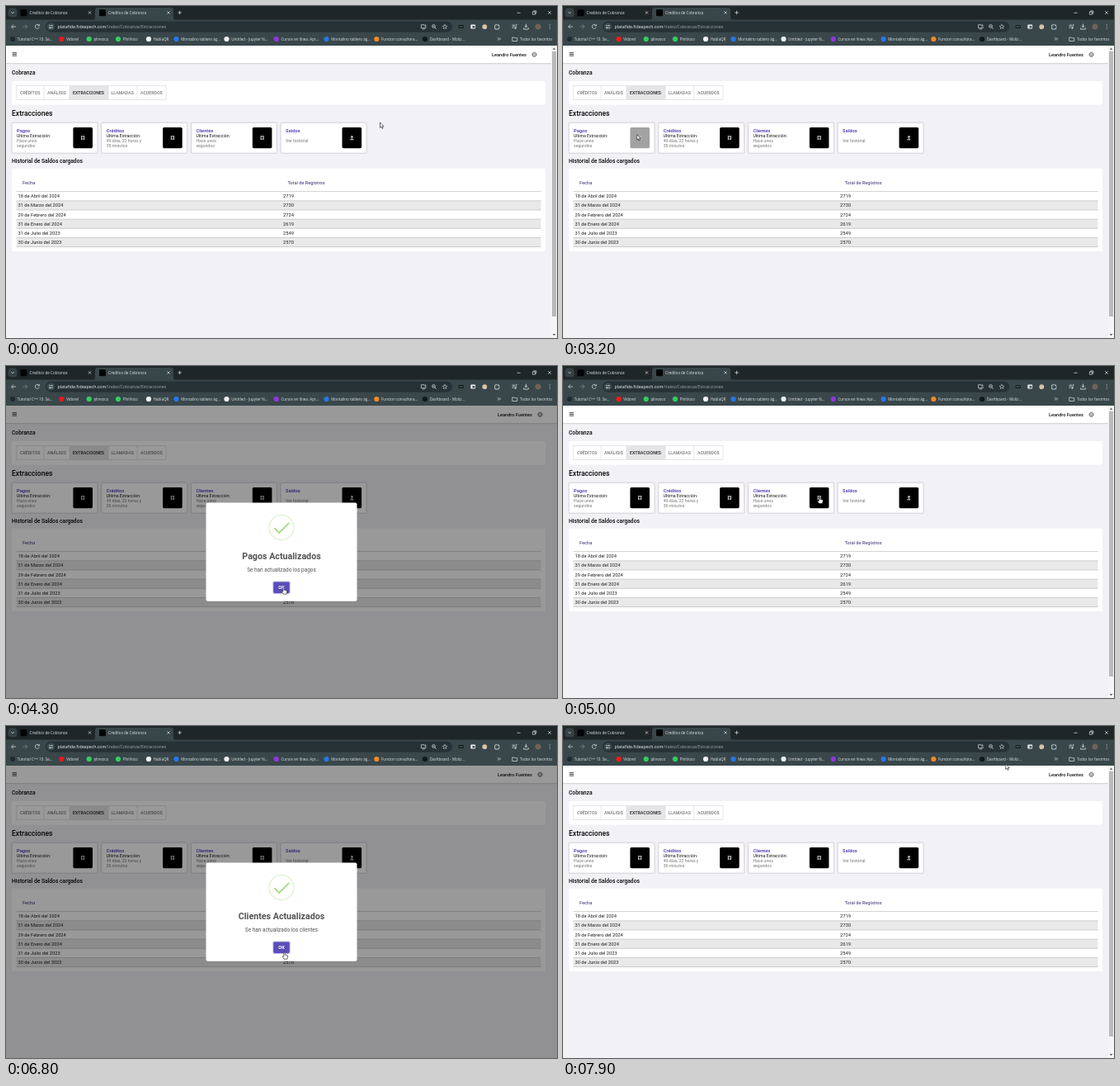
An HTML page that plays this animation: 668 px wide and 402 px high, repeating every 8.7 s.

```html
<!DOCTYPE html>
<html lang="es">
<head>
<meta charset="utf-8">
<title>Extracciones</title>
<style>
  html, body { margin: 0; width: 100%; height: 100%; overflow: hidden; background: #f1f1f6; }
  svg { display: block; width: 100%; height: 100%; }
  text { font-family: Roboto, sans-serif; white-space: pre; }
  .ui { font-family: "Open Sans", "Noto Sans", sans-serif; }
</style>
</head>
<body>
<svg id="stage" viewBox="0 0 668 402" xmlns="http://www.w3.org/2000/svg"></svg>
<script>
const LOOP = 8700, STEP = 100;
const PURPLE = '#4a2fb0', LIGHT = '#dfe5e6';

// Markup helpers
const rect = (x, y, w, h, fill, extra = '') =>
  `<rect x="${x}" y="${y}" width="${w}" height="${h}" fill="${fill}" ${extra}/>`;
const dot = (x, y, r, fill, extra = '') => `<circle cx="${x}" cy="${y}" r="${r}" fill="${fill}" ${extra}/>`;
const line = (d, color = LIGHT, width = 0.7, extra = '') =>
  `<path d="${d}" fill="none" stroke="${color}" stroke-width="${width}" ${extra}/>`;
const text = (x, y, str, size, fill, extra = '') =>
  `<text x="${x}" y="${y}" font-size="${size}" fill="${fill}" ${extra}>${str}</text>`;
const uiText = (x, y, str, size = 4.6, fill = LIGHT) => text(x, y, str, size, fill, 'class="ui"');
const cross = (x, y, r) => line(`M${x - r} ${y - r}l${2 * r} ${2 * r}m0 ${-2 * r}l${-2 * r} ${2 * r}`);
const medium = 'font-weight="500"', bold = 'font-weight="700"';

function tabStrip() {
  const tab = x => rect(x, 4.2, 8, 8, '#050505', 'rx="1"') + uiText(x + 11, 9.9, 'Creditos de Cobranza') + cross(x + 84, 8, 1.6);
  return rect(0, 0, 668, 17, '#1e2628') +
    rect(2.5, 2.5, 11, 11, '#344145', 'rx="3.5"') + line('M6.2 7.2l1.8 1.8 1.8-1.8') +
    `<path d="M105 17q3 0 3-3V5q0-3 3-3h89q3 0 3 3v9q0 3 3 3z" fill="#39474b"/>` +
    tab(17.5) + tab(113) +
    line('M208.3 8h4.6M210.6 5.7v4.6M619.5 8.3h4.2') +
    line('M638.4 7h3.2v3.2h-3.2zM639.6 7V5.9h3.2V9h-1.2') + cross(659, 8, 1.8);
}

function toolbar() {
  const url = `platafide.fideapech.com<tspan fill="#9eabae">/Index/Cobranza/Extracciones</tspan>`;
  return rect(0, 16.5, 668, 31.5, '#39474b') +
    line('M12 25H6.5m2.5-2.5L6.5 25 9 27.5') + line('M20.5 25H26m-2.5-2.5L26 25l-2.5 2.5', '#7f8c90') +
    line('M40 23.6a2.5 2.5 0 1 0 .2 2.2M40.3 22v2h-2') +
    rect(48, 18.5, 493, 13.2, '#273236', 'rx="6.6"') + dot(54.3, 25, 4.6, '#3d4b50') +
    line('M52 23.8h2.8M52 26.4h1M54.4 26.4H57') + dot(55.8, 23.8, 0.8, LIGHT) + dot(53.4, 26.4, 0.8, LIGHT) +
    uiText(62.5, 27, url, 5.24, '#f1f4f4') +
    line('M507 22.7h-3.5v4h5.6v-1.5M504.8 28h3M508.3 22v2.7m-1.2-1.1l1.2 1.2 1.2-1.2') +
    dot(518.5, 24.5, 1.9, 'none', `stroke="${LIGHT}" stroke-width=".7"`) + line('M520 26l1.8 1.8M517.6 24.5h1.8') +
    line('M532 22.2l.8 1.9 2.1.2-1.6 1.3.5 2-1.8-1.1-1.8 1.1.5-2-1.6-1.3 2.1-.2z', LIGHT, 0.55) +
    rect(548.5, 23, 6.5, 4, '#151b1c', 'rx="1.5"') + line('M549.7 25h4', '#8ec9a4', 0.8, 'stroke-dasharray="1 .5"') +
    rect(563.3, 22.5, 5.8, 5, '#e8eceb', 'rx=".8"') + rect(565.5, 24.2, 2.8, 2.2, '#343e42') +
    dot(580.3, 25.2, 2.9, '#d8c3a4') +
    line('M592.7 23h1.5q.3-1.6 1.4 0h2v1.8q1.5.7 0 1.5V28h-4.9z', LIGHT, 0.8) +
    line('M613.6 23h3.3M613.6 24.7h3.3M613.6 26.4h1.7M618.2 26.7v-4h1.5') + dot(617.4, 26.7, 1, LIGHT) +
    line('M630.5 21.6v4m-1.8-1.6l1.8 1.8 1.8-1.8M627.7 26.4v1.7h5.6v-1.7', LIGHT, 0.8) +
    dot(645, 25, 3.5, '#74605c') + [22.8, 25, 27.2].map(y => dot(659.3, y, 0.55, LIGHT)).join('');
}

function bookmarks() {
  const items = [
    [8, '#20292d', 'Tutorial C++ 10. Se...'], [67.5, '#f01818', 'Vidorel'], [100.7, '#31cf62', 'plinvoco'],
    [136, '#31cf62', 'PlinVoco'], [173, '#f2f4f4', 'HablaQR'], [206.5, '#2876e8', 'Montalino tablero ág...'],
    [267.5, '#eef0f0', 'Untitled - Jupyter N...'], [327.7, '#9037e0', 'Cursos en línea: Apr...'],
    [388.5, '#2876e8', 'Montalino tablero ág...'], [449.3, '#f28a24', 'Funcion consultora...'],
    [508, '#111819', 'Dashboard - Moliz...']
  ];
  return items.map(([x, color, label]) => dot(x, 40, 3.1, color) + uiText(x + 5.7, 41.7, label, 4.55)).join('') +
    line('M596 38.3l1.6 1.6-1.6 1.6m2-3.2l1.6 1.6-1.6 1.6') +
    line('M613.8 38h2.2l.8.8h3v3.7h-6z') + uiText(623, 41.7, 'Todos los favoritos', 4.5);
}

function card(x, title, id, lines) {
  const grey = '#777';
  const body = lines.length === 1
    ? text(x + 6, 164.8, lines[0], 5.2, grey)
    : text(x + 6, 158.8, 'Ultima Extracción:', 5.15, '#161616') +
      text(x + 6, 164.8, lines[0], 5.15, grey) + text(x + 6, 170.8, lines[1], 5.15, grey, `id="${id}Age"`);
  const cx = x + 86.2;
  const icon = lines.length === 1
    ? line(`M${cx} 161v-3.6m-1.5 1.5l1.5-1.6 1.5 1.6M${cx - 2.1} 161.8h4.2`, '#fff', 0.9)
    : line(`M${cx - 1.6} 157.9h3.2v3.2h-3.2z`, '#fff', 0.8) +
      line(`M${cx - 2.2} 157.4h1m2.4 0h1m-4.4 4.3h1m2.4 0h1`, '#fff', 0.7);
  return rect(x, 141.2, 104, 37, '#fff', 'rx="1" stroke="#cdc5ce" stroke-width=".8"') +
    text(x + 6, 152.5, title, 5.75, PURPLE, medium) + body +
    rect(x + 74.4, 147, 23.6, 25.2, '#000', `rx="1.6" id="${id}Button"`) + `<g id="${id}Icon">${icon}</g>`;
}

function table() {
  const rows = [['18 de Abril del 2024', 2719], ['31 de Marzo del 2024', 2730], ['29 de Febrero del 2024', 2724],
    ['31 de Enero del 2024', 2619], ['31 de Julio del 2023', 2549], ['30 de Junio del 2023', 2570]];
  const rule = y => line(`M12.5 ${y}H648.5`, '#bdbdbf', 0.7);
  return rect(7, 196.5, 647, 100.5, '#fff', 'rx="2"') +
    text(20, 215.8, 'Fecha', 5.65, '#5b5288', medium) + text(341.5, 215.8, 'Total de Registros', 5.6, '#5b5288', medium) +
    rule(224.6) + rows.map(([date, total], i) => {
      const y = 224.7 + i * 11.15;
      return (i % 2 ? rect(12.5, y, 636, 11.15, '#e9e9ea') + rule(y) + rule(y + 11.15) : '') +
        text(14.5, y + 7.5, date, 5.72, '#1c1c1c') + text(336, y + 7.5, total, 5.75, '#1c1c1c');
    }).join('');
}

function page() {
  const tabs = [[17, 'CRÉDITOS'], [50, 'ANÁLISIS'], [81, 'EXTRACCIONES'], [127.5, 'LLAMADAS'], [163, 'ACUERDOS']];
  return rect(0, 48, 668, 354, '#f1f1f6') + rect(0, 48, 668, 21.5, '#fff') + rect(0, 69.3, 668, 0.9, '#c9c9ce') +
    line('M7.6 56.6h5.4M7.6 58.4h5.4M7.6 60.2h5.4', '#333', 0.9) +
    `<g id="account">${text(589, 61, 'Leandro Fuentes', 5.6, '#161616', medium)}
      ${dot(640.5, 58.8, 2.2, 'none', 'stroke="#444" stroke-width=".7"')}
      ${dot(640.5, 58.8, 2.8, 'none', 'stroke="#444" stroke-width=".7" stroke-dasharray="1.1 1.1"')}
      ${dot(640.5, 58.8, 0.8, 'none', 'stroke="#444" stroke-width=".5"')}</g>` +
    text(7, 83.2, 'Cobranza', 6.7, '#080808', medium) +
    rect(7, 91, 647, 28.7, '#fff', 'rx="2"') + rect(77, 96.5, 47, 17, '#e5e5e7') +
    line('M12.7 96.5H194V113.5H12.7zM46 96.5v17M77 96.5v17M124 96.5v17M159 96.5v17', '#dcdce0', 0.7) +
    tabs.map(([x, s], i) => text(x, 106.8, s, 5.25, i === 2 ? '#222' : '#777', medium)).join('') +
    text(7, 133.2, 'Extracciones', 8.6, '#080808', medium) +
    card(7, 'Pagos', 'pagos', ['Hace unos', 'segundos']) +
    card(115.7, 'Créditos', 'creditos', ['49 días, 22 horas y', '35 minutos']) +
    card(224.4, 'Clientes', 'clientes', ['Hace unos', 'segundos']) +
    card(333.1, 'Saldos', 'saldos', ['Ver historial']) +
    text(7, 189.8, 'Historial de Saldos cargados', 6.7, '#080808', medium) + table() +
    `<g id="scrollbar">${rect(661, 48, 7, 354, '#f5f5f6') + rect(662, 55, 5, 321, '#b9b9bb')}
      <path d="M662.6 52.7l1.9-2.2 1.9 2.2zM662.6 397l1.9 2.2 1.9-2.2z" fill="#666"/></g>`;
}

function dialog() {
  const centred = 'text-anchor="middle" ';
  return rect(0, 48, 668, 354, '#000', 'id="shade"') + `<g id="dialog">` +
    rect(242.5, 165.6, 183, 119.2, '#fff', 'rx="2"') +
    dot(334, 195.5, 15, 'none', 'stroke="#a5dc86" stroke-opacity=".35" stroke-width="1.4"') +
    line('M325.3 196.2L331 202 343.2 190', '#a5dc86', 1.8, 'id="check" pathLength="1" stroke-dasharray="1 2"') +
    text(334, 233.8, '', 10.7, '#545454', centred + bold + ' id="dialogTitle"') +
    text(334, 248.8, '', 6.45, '#545454', centred + 'id="dialogText"') +
    rect(323.3, 260.4, 21.4, 15.6, '#c3bdf0', 'rx="2"') + rect(324.3, 261.4, 19.4, 13.6, '#7066e0', 'rx="1.4" id="ok"') +
    text(334, 270.2, 'OK', 5.6, '#fff', centred + bold) + '</g>';
}

const cursor = `<g id="cursor" stroke="#111" stroke-width=".6" stroke-linejoin="round" fill="#fff">
  <path id="arrow" d="M0 0V6.4L1.5 5.1 2.5 7.4 3.6 6.9 2.6 4.7H4.6Z"/>
  <path id="hand" d="M-.7.6Q0-.6.7.6V3.1L3.6 3.8Q4.4 4 4.2 5L3.5 8.2H-.5L-2.6 5.2Q-2.4 4.2-.7 5.2Z"/></g>`;

document.getElementById('stage').innerHTML = tabStrip() + toolbar() + bookmarks() + page() + dialog() + cursor;
const $ = id => document.getElementById(id);
const show = (id, on) => $(id).setAttribute('visibility', on ? 'visible' : 'hidden');

// Time, x, y of the pointer tip
const pointerPath = [
  [0, 453.5, 141], [900, 453.5, 141], [1100, 447, 142], [1400, 447, 142], [1500, 400, 148], [1700, 165, 150],
  [1800, 114.5, 143], [1900, 126, 135], [2000, 126, 135], [2300, 150, 103], [2600, 105, 150], [2800, 86, 165],
  [3000, 89.7, 155.7], [3400, 89.7, 155.7], [3800, 300, 250], [4000, 336.5, 268], [4400, 336.5, 268],
  [4700, 318, 164], [4900, 311, 158.3], [5700, 311, 158.3], [6300, 334, 266], [6500, 337.5, 274],
  [7000, 337.5, 274], [7200, 380, 158], [7500, 541, 43], [7700, 541, 43], [7900, 536.7, 46], [LOOP, 536.7, 46]
];
const alerts = [
  { name: 'Pagos', button: 'pagos', click: 3000, open: 3400, close: 4500 },
  { name: 'Clientes', button: 'clientes', click: 5500, open: 5700, close: 7100 }
];
const popKeys = [[0, 0.7], [135, 1.05], [240, 0.95], [300, 1], [LOOP, 1]];

function sample(keys, t) {
  const i = Math.max(1, keys.findIndex(k => k[0] >= t));
  const [a, b] = [keys[i - 1], keys[i]];
  const p = (t - a[0]) / (b[0] - a[0]);
  return a.slice(1).map((v, j) => v + (b[j + 1] - v) * p);
}
const inside = (x, y, left, top, w, h) => x >= left && x <= left + w && y >= top && y <= top + h;

function render(time) {
  const t = Math.floor((time % LOOP) / STEP) * STEP;
  const [x, y] = sample(pointerPath, t);
  const alert = alerts.find(a => t >= a.open && t < a.close + STEP);
  const loading = alerts.find(a => t >= a.click && t < a.open);

  for (const { button } of alerts) {
    const busy = loading && loading.button === button;
    $(button + 'Button').setAttribute('fill', busy ? '#a2a2a3' : '#000');
    $(button + 'Icon').setAttribute('opacity', busy ? 0.35 : 1);
  }
  $('creditosAge').textContent = t < alerts[0].open ? '35 minutos' : '36 minutos';
  $('account').setAttribute('transform', `translate(${alert ? 7 : 0})`);
  show('scrollbar', !alert);
  show('shade', alert);
  show('dialog', alert);

  const overOk = alert && inside(x, y, 323, 260, 22, 16);
  if (alert) {
    const age = t - alert.open + 54;
    const closing = t >= alert.close;
    const scale = closing ? 0.75 : sample(popKeys, age)[0];
    const drawn = Math.min(1, Math.max(0, (age - 400) / 350));
    $('shade').setAttribute('opacity', closing ? 0.2 : 0.4);
    $('dialog').setAttribute('opacity', closing ? 0.5 : 1);
    $('dialog').setAttribute('transform', `translate(334 225) scale(${scale}) translate(-334 -225)`);
    $('check').setAttribute('stroke-dashoffset', 1 - drawn);
    $('check').setAttribute('opacity', drawn ? 1 : 0);
    $('dialogTitle').textContent = alert.name + ' Actualizados';
    $('dialogText').textContent = `Se han actualizado los ${alert.name.toLowerCase()}`;
    $('ok').setAttribute('fill', overOk ? '#5a4db8' : '#7066e0');
  }

  const overCard = !alert && !loading && [81.4, 190.1, 298.8, 407.5].some(left => inside(x, y, left, 147, 23.6, 25.2));
  const hand = Boolean(overOk || overCard);
  show('hand', hand);
  show('arrow', !hand);
  $('cursor').setAttribute('transform', `translate(${x} ${y})`);
}

const start = performance.now();
function tick() {
  render(performance.now() - start);
  requestAnimationFrame(tick);
}
tick();
</script>
</body>
</html>
```
